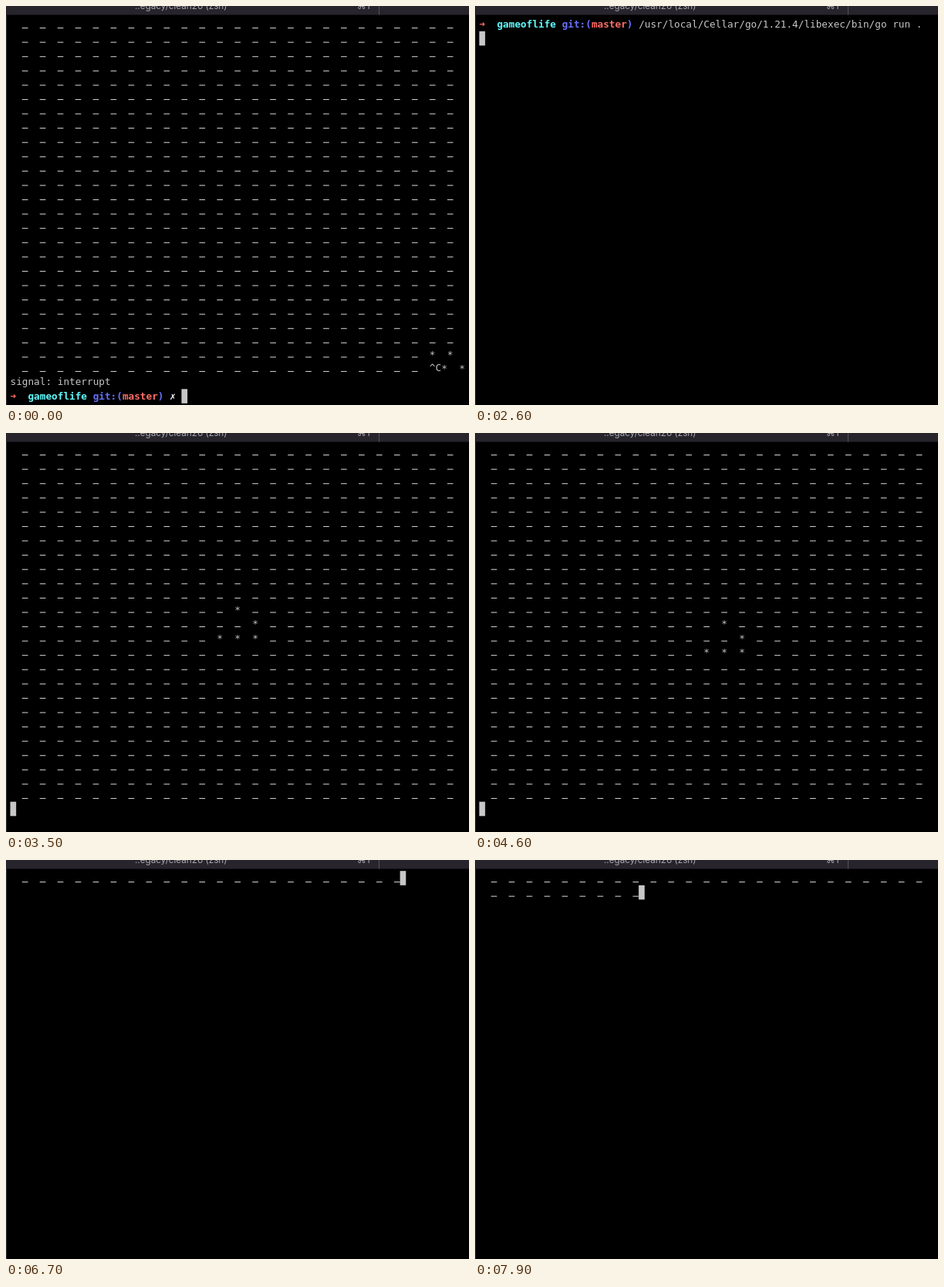
Write an HTML page with a canvas that moves like this. It is 600x518 px and loops after 8 s.

```html
<!DOCTYPE html>
<html lang="en">
<head>
<meta charset="utf-8">
<title>Game of Life in a terminal</title>
<style>
  html, body { margin: 0; width: 100%; height: 100%; overflow: hidden; background: #000; }
  canvas { display: block; width: 600px; height: 518px; }
</style>
</head>
<body>
<canvas id="stage" width="600" height="518"></canvas>
<script>
const ctx = document.getElementById('stage').getContext('2d');
const W = 600, H = 518, LOOP = 8000;
const LEFT = 5.5, TOP = 14.2, CW = 7.653, RH = 18.58;
const SIZE = 25;
const MONO = '12.71px "DejaVu Sans Mono", monospace';
const FG = '#c7c7c7', RED = '#ff6e67', BLUE = '#6871ff', CYAN = '#5ffdff';
const COMMAND = '/usr/local/Cellar/go/1.21.4/libexec/bin/go run .';

const colX = col => LEFT + col * CW;
const rowY = row => TOP + row * RH;

// Game of Life
const makeBoard = alive => Array.from({ length: SIZE }, (_, r) =>
  Array.from({ length: SIZE }, (_, c) => alive(r, c)));

function step(board) {
  return makeBoard((r, c) => {
    let n = 0;
    for (let y = r - 1; y <= r + 1; y++)
      for (let x = c - 1; x <= c + 1; x++)
        if ((y !== r || x !== c) && board[y] && board[y][x]) n++;
    return n === 3 || (n === 2 && board[r][c]);
  });
}

const toLines = board => board.map(row => row.map(on => on ? '  *' : '  _').join(''));

const glider = ['11,12', '12,13', '13,11', '13,12', '13,13'];
const generations = [makeBoard((r, c) => glider.includes(r + ',' + c))];
for (let i = 0; i < 16; i++) generations.push(step(generations[i]));

// The run was interrupted after the glider had settled into a corner block
const endLines = toLines(makeBoard((r, c) => r > 22 && c > 22));
endLines[SIZE - 1] = '  _'.repeat(SIZE - 2) + '  ^C*  *';

// Drawing
function put(text, row, col = 0, color = FG, bold = false) {
  ctx.font = (bold ? 'bold ' : '') + MONO;
  ctx.fillStyle = color;
  [...text].forEach((ch, i) => {
    const x = colX(col + i), y = rowY(row);
    if (ch === '_') ctx.fillRect(x, y + 13.8, CW, 1.1);
    else if (ch !== ' ') ctx.fillText(ch, x, y + (ch === '*' ? 15.1 : 13.7));
  });
}

function cursor(row, col) {
  ctx.fillStyle = FG;
  ctx.fillRect(colX(col), rowY(row), CW, RH);
}

function promptName(row) {
  put('➜', row, 0, RED, true);
  put('gameoflife', row, 3, CYAN, true);
}

function prompt(row) {
  promptName(row);
  put('git:(', row, 14, BLUE, true);
  put('master', row, 19, RED, true);
  put(')', row, 25, BLUE, true);
}

const putLines = lines => lines.forEach((line, row) => put(line, row));

function showBoard(gen) {
  putLines(toLines(generations[gen]));
  cursor(SIZE, 0);
}

// Only the first cells have been printed so far
function showPartial(gen, cells) {
  const lines = toLines(generations[gen]);
  const row = Math.floor(cells / SIZE), col = cells % SIZE * 3;
  putLines(lines.slice(0, row));
  put(lines[row].slice(0, col), row);
  cursor(row, col);
}

function showInterrupted(typed) {
  putLines(endLines);
  put('signal: interrupt', SIZE);
  prompt(SIZE + 1);
  put('✗', SIZE + 1, 27, '#fff', true);
  put(typed, SIZE + 1, 29);
  cursor(SIZE + 1, 29 + typed.length);
}

function showCommand(running) {
  prompt(0);
  put(COMMAND, 0, 27);
  if (running) cursor(1, 0);
  else cursor(0, 27 + COMMAND.length);
}

function frameWindow() {
  ctx.fillStyle = '#333237';
  ctx.fillRect(0, 0, 1, H);
  ctx.fillStyle = '#27242c';
  ctx.fillRect(0, 0, W, 11.5);
  ctx.fillStyle = '#55535a';
  ctx.fillRect(483, 0, 1, 11.5);
  ctx.fillStyle = '#a9a8ac';
  ctx.font = '11.7px Inter, sans-serif';
  ctx.fillText('..egacy/clean26 (zsh)', 167, 3.6);
  ctx.font = '11.7px "DejaVu Sans", sans-serif';
  ctx.fillText('⌘', 455, 3.6);
  ctx.font = '11.7px Inter, sans-serif';
  ctx.fillText('1', 467, 3.6);
}

const scenes = [
  [0, () => showInterrupted('')],
  [100, () => showInterrupted('c')],
  [200, () => showInterrupted('cle')],
  [300, () => showInterrupted('clear')],
  [400, () => { promptName(0); cursor(0, 14); }],
  [1000, () => showCommand(false)],
  [2600, () => showCommand(true)],
  [3400, () => { ctx.fillStyle = '#1d1a1f'; ctx.fillRect(0, 200, W, H - 200); }],
  [3500, () => showBoard(0)],
  [3700, t => showBoard(1 + Math.floor((t - 3700) / 300))],
  [6700, () => showPartial(11, 22)],
  [6800, () => showBoard(11)],
  [7000, () => showBoard(12)],
  [7300, () => showPartial(13, 29)],
  [7400, () => showBoard(13)],
  [7600, () => showBoard(14)],
  [7900, () => showPartial(15, 34)]
];

const start = performance.now();

function draw() {
  const t = (performance.now() - start) % LOOP;
  ctx.fillStyle = '#000';
  ctx.fillRect(0, 0, W, H);
  scenes.filter(([from]) => from <= t).pop()[1](t);
  frameWindow();
  requestAnimationFrame(draw);
}
draw();
</script>
</body>
</html>
```
